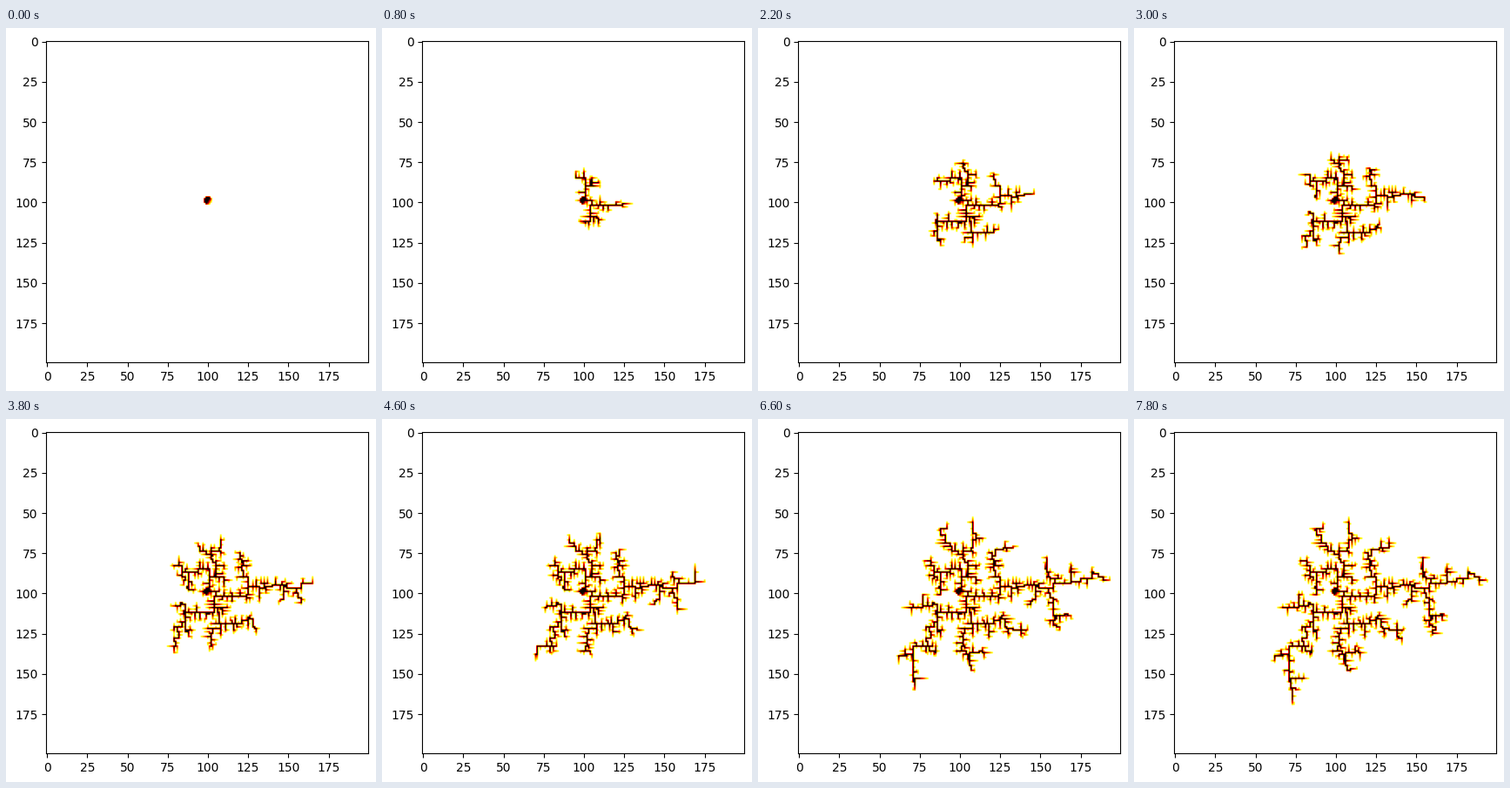
Recreate the animation shown at these times as a matplotlib script. Size 425x417 px, loop 8000 ms.

```python
import random

import numpy as np
import matplotlib.pyplot as plt
from matplotlib.animation import FuncAnimation

W, H, DPI = 425, 417, 100
SIZE, FRAMES, STEP_MS = 200, 40, 200
ROOT = (100, 99)
STEPS = [(1, 0), (-1, 0), (0, 1), (0, -1)]

# Each limb: arrival time of its tip in seconds, then x, y waypoints.
# It sprouts from the nearest cell of the limbs above it.
LIMBS = [
    (6.6, 109, 103, 122, 102, 125, 96, 142, 95, 158, 97, 175, 93, 183, 87, 189, 93),
    (6.4, 101, 91, 108, 83, 102, 75, 94, 70, 88, 62, 92, 56),
    (7.6, 98, 112, 86, 112, 82, 124, 71, 133, 72, 158, 74, 169),
    (6.6, 109, 109, 108, 119, 102, 128, 101, 136, 106, 143, 109, 149),
    (2.2, 97, 85, 84, 89),
    (4.5, 81, 80),
    (0.8, 110, 91),
    (1.6, 88, 99),
    (6.4, 110, 67, 108, 57),
    (6.4, 122, 90, 120, 77, 136, 71),
    (2.0, 135, 90),
    (2.0, 132, 103),
    (2.2, 122, 117),
    (7.6, 128, 116, 141, 132),
    (5.0, 118, 124),
    (3.4, 144, 105),
    (7.4, 158, 107, 160, 126),
    (5.6, 168, 114),
    (3.6, 159, 91),
    (7.4, 153, 83, 158, 78),
    (5.4, 168, 84),
    (6.6, 83, 107, 75, 109, 64, 109),
    (6.0, 77, 101),
    (6.6, 63, 138),
    (6.2, 85, 138),
    (6.8, 83, 153),
    (2.2, 88, 124),
    (5.6, 115, 136),
]

rng = random.Random(11)


def wander(a, b):
    """Jagged lattice walk from a to b."""
    (x, y), step, path = a, (0, 0), []
    while (x, y) != b:
        dx, dy = b[0] - x, b[1] - y
        if rng.random() < 0.12:
            step = rng.choice(STEPS)
        elif step[0] * dx + step[1] * dy <= 0 or rng.random() < 0.4:
            if rng.random() * (abs(dx) + abs(dy)) < abs(dx):
                step = (1 if dx > 0 else -1, 0)
            else:
                step = (0, 1 if dy > 0 else -1)
        x, y = x + step[0], y + step[1]
        path.append((x, y))
    return path


def plan():
    """Growth events (time, cell, previous cell) of all limbs, in order."""
    born, events = {ROOT: 0.0}, []
    for end, *pts in LIMBS:
        stops = list(zip(pts[::2], pts[1::2]))
        px, py = stops[0]
        start = min(born, key=lambda c: (c[0] - px) ** 2 + (c[1] - py) ** 2)
        path, here = [], start
        for stop in stops:
            path += wander(here, stop)
            here = stop
        t0, prev = born[start], start
        span = max(end - t0, 0.2)
        for i, cell in enumerate(path, 1):
            t = t0 + span * (i / len(path)) ** 1.5
            events.append((t, cell, prev))
            born.setdefault(cell, t)
            prev = cell
    return sorted(events, key=lambda e: e[0])


def crowd(cell, tree):
    x, y = cell
    return sum((x + i, y + j) in tree for i in (-1, 0, 1) for j in (-1, 0, 1))


def sprout(tree, depth, cell):
    """Grow one short twig into free space."""
    step = rng.choice(STEPS)
    for _ in range(rng.randint(2, 6)):
        if rng.random() < 0.35:
            step = rng.choice(STEPS)
        new = (cell[0] + step[0], cell[1] + step[1])
        if new in tree or depth[cell] >= 6 or crowd(new, tree) > 3:
            return
        tree[new], depth[new] = cell, depth[cell] + 1
        cell = new


def wither(tree, core):
    """Drop some of the loose twig ends."""
    inner = set(tree.values())
    for cell in list(tree):
        if cell not in inner and cell not in core and rng.random() < 0.1:
            del tree[cell]


def paint(tree):
    """Shade each cell by how many cells hang on it."""
    load = dict.fromkeys(tree, 1)
    img = np.zeros((SIZE, SIZE))
    for cell in reversed(list(tree)):
        if tree[cell] is not None:
            load[tree[cell]] += load[cell]
        x, y = cell
        img[y, x] = min(1, 0.1 + 0.15 * load[cell])
    for i in range(-2, 3):
        for j in range(-2, 3):
            if i * i + j * j <= 5:
                x, y = ROOT[0] + i, ROOT[1] + j
                shade = 1 - 0.35 * max(0, i + 0.6 * j - 0.4)
                img[y, x] = max(img[y, x], shade)
    return img


def grow():
    events = plan()
    tree, depth, core = {ROOT: None}, {ROOT: 0}, {ROOT}
    images, k = [], 0
    for frame in range(FRAMES):
        t = frame * STEP_MS / 1000
        if frame > 1:
            wither(tree, core)
            while k < len(events) and events[k][0] <= t:
                _, cell, prev = events[k]
                tree.setdefault(cell, prev)
                depth[cell] = 0
                core.add(cell)
                k += 1
            for _ in range(40):
                cells = list(tree)
                for _ in range(80):
                    if len(tree) < 2.8 * len(core):
                        sprout(tree, depth, rng.choice(cells))
        images.append(paint(tree))
    return images


images = grow()

fig = plt.figure(figsize=(W / DPI, H / DPI), dpi=DPI, facecolor="white")
ax = fig.add_axes([46.2 / W, 32.7 / H, 369.6 / W, 369.6 / H])
picture = ax.imshow(images[0], cmap="hot_r", vmin=0, vmax=1)
ax.set_xticks(range(0, SIZE, 25))
ax.set_yticks(range(0, SIZE, 25))


def draw(frame):
    picture.set_data(images[frame])
    return (picture,)


anim = FuncAnimation(fig, draw, frames=FRAMES, interval=STEP_MS,
                     init_func=lambda: draw(0), repeat=True, repeat_delay=0)
plt.show()
```
